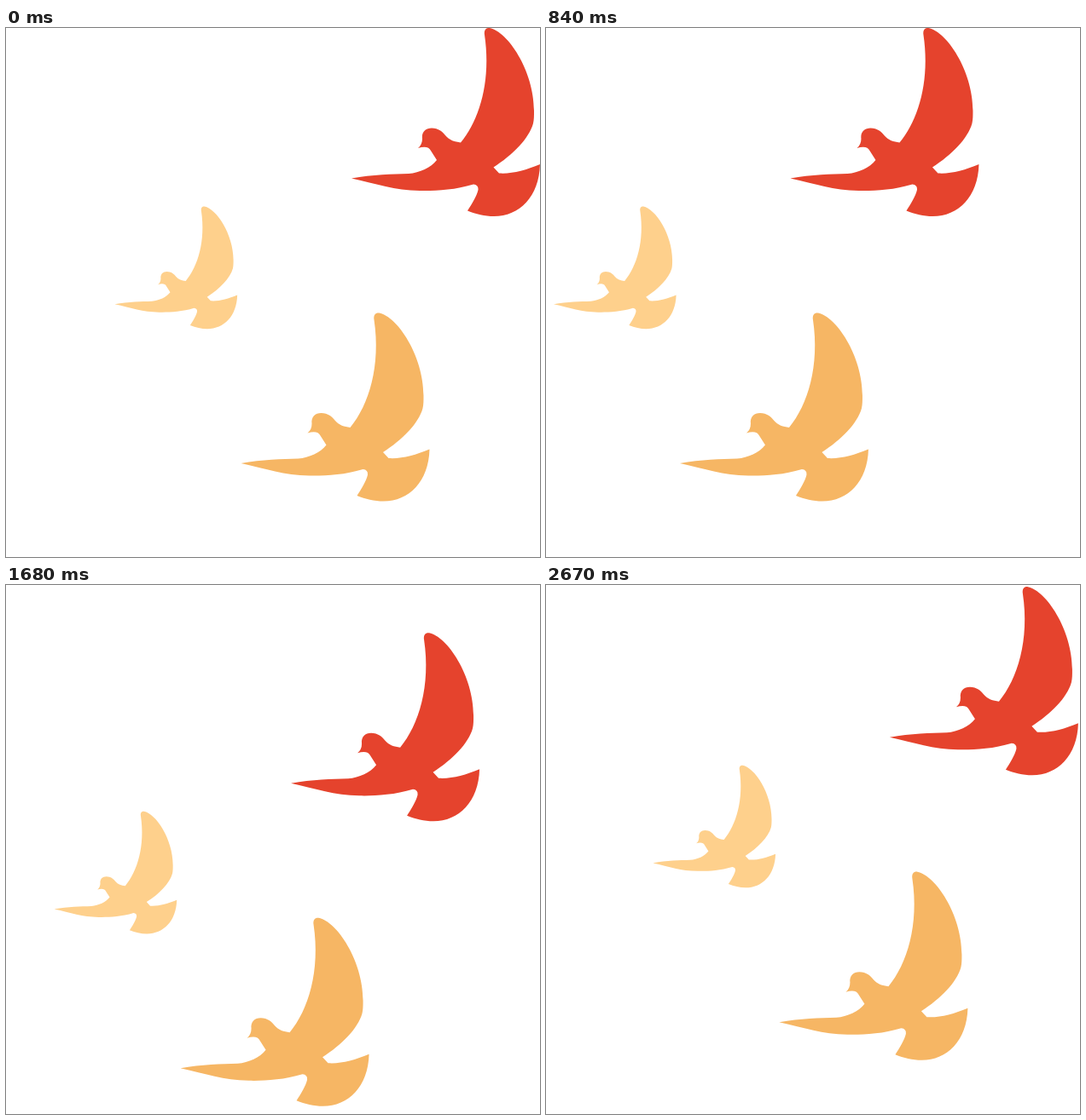
These frames come from a looping animation (626x621 px, 2700 ms). An HTML page with a canvas:

```html
<!DOCTYPE html>
<html lang="en">
<head>
<meta charset="utf-8">
<title>Three birds</title>
<style>
html, body { margin: 0; width: 100%; height: 100%; overflow: hidden; background: #fff; }
canvas { display: block; }
</style>
</head>
<body>
<canvas id="stage" width="626" height="621"></canvas>
<script>
const ctx = document.getElementById('stage').getContext('2d');
const LOOP = 2700, STEP = 30, LEG = 900;

// Bird outline, starting at the tip of the front wing
const bird = new Path2D(`M0 176.5
  C25 172 48 171.5 67 171 C80 170 93 164 100 155
  L93 144 Q90 137.5 78 141 Q83 137 83 130
  C82 122 87 117.5 94 117.5 C102 117.5 107 122 110 126
  C115 132 121 133.5 128 134.5
  C150 108 164 62 156 8 C155 2 158 -.5 162 0
  C183 4 214 50 214 97 C214 103 214 107 213 112
  C208 130 189 149 166.5 163.5 L173 170.5
  C188 171.5 204 167 221 160
  C220 198 197 221 167 221 C156 221 146 218.5 136 214.5
  C141 207 147 197 148.5 190 Q149 184 143 183.5
  C120 190.5 97 191.3 80 191 C50 190.5 30 183 0 176.5 Z`);

const flock = [
  { x: 405, y: 0, scale: 1, color: '#e5432d' },
  { x: 275.5, y: 334.5, scale: 1, color: '#f6b664' },
  { x: 127.5, y: 209.5, scale: 0.65, color: '#fed08c' }
];

// The flock flies around a triangle, one side per leg
const corners = [[0, 0], [-127, 0], [-62.3, 65]];

function offsetAt(time) {
  const leg = Math.floor(time / LEG);
  const part = time / LEG - leg;
  const from = corners[leg], to = corners[(leg + 1) % corners.length];
  return from.map((v, i) => v + (to[i] - v) * part);
}

function draw(now) {
  const time = Math.floor((now % LOOP) / STEP) * STEP;
  const [dx, dy] = offsetAt(time);
  ctx.fillStyle = '#fff';
  ctx.fillRect(0, 0, 626, 621);
  for (const { x, y, scale, color } of flock) {
    ctx.save();
    ctx.translate(x + dx, y + dy);
    ctx.scale(scale, scale);
    ctx.fillStyle = color;
    ctx.fill(bird);
    ctx.restore();
  }
}

const start = performance.now();
function tick() {
  draw(performance.now() - start);
  requestAnimationFrame(tick);
}
tick();
</script>
</body>
</html>
```
